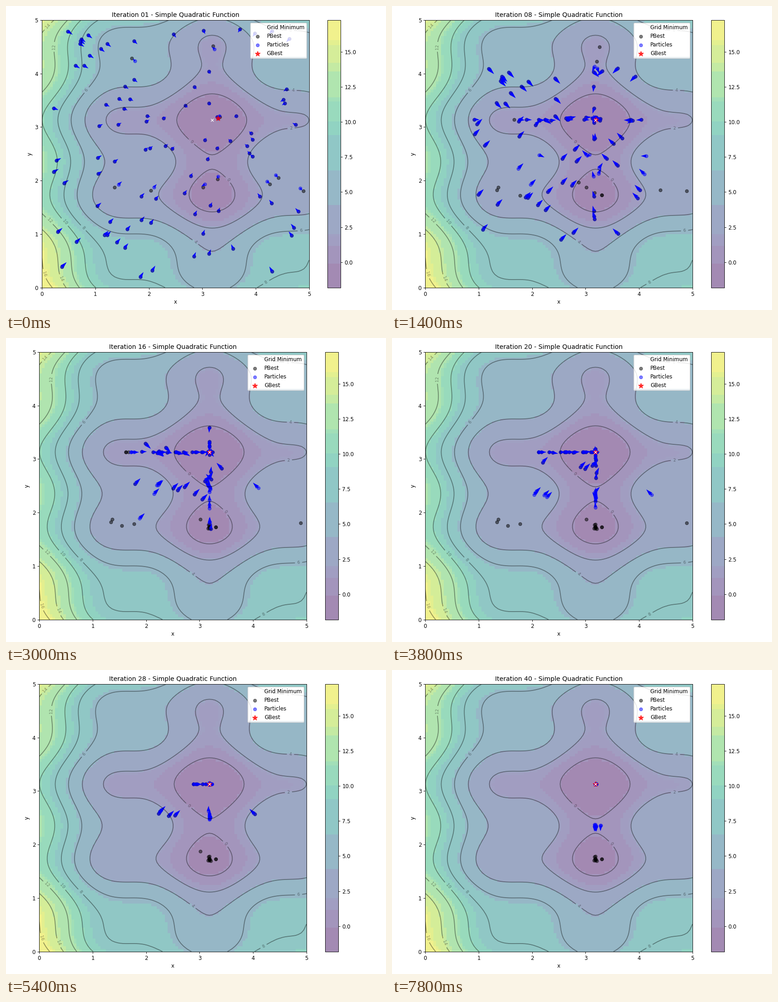
A matplotlib script for the animation above (8000 ms loop, 837x669 px).

```python
import numpy as np
import matplotlib.pyplot as plt
from matplotlib.animation import FuncAnimation
from matplotlib.colors import ListedColormap
from matplotlib.patches import Rectangle

W, H, DPI = 837, 669, 83.65
STEPS, INTERVAL = 40, 200
N = 100
INERTIA, C1, C2, V_MAX = 0.3, 1.0, 1.0, 0.1
SIDE = 588.8  # plot area in pixels
LABELS = [(0.106, 4.89), (0.216, 4.50), (0.828, 3.70), (4.70, 3.70),
          (4.66, 2.99), (2.81, 2.74), (3.49, 2.02), (2.88, 0.86),
          (4.85, 1.07), (4.19, 0.11), (0.15, 1.26), (0.44, 1.235),
          (0.785, 1.125), (0.055, 0.26), (0.37, 0.165), (4.65, 4.82)]


def f(x, y):
    return (x - 3.14)**2 + (y - 2.72)**2 + np.sin(3 * x + 1.41) + np.sin(4 * y - 1.73)


def swarm():
    """Positions, velocities, personal bests and global best for every step."""
    rng = np.random.RandomState(100)
    pos = rng.rand(2, N) * 5
    vel = rng.randn(2, N) * 0.1
    best, best_val = pos.copy(), f(*pos)
    lead = best[:, best_val.argmin()]
    states = []
    for step in range(STEPS + 1):
        r1, r2 = rng.rand(2)
        vel = INERTIA * vel + C1 * r1 * (best - pos) + C2 * r2 * (lead[:, None] - pos)
        vel = np.clip(vel, -V_MAX, V_MAX)
        pos = pos + vel
        val = f(*pos)
        best = np.where(val <= best_val, pos, best)
        best_val = np.minimum(val, best_val)
        lead = best[:, best_val.argmin()]
        if step:  # the first move is a warm-up
            states.append((pos, vel, best, lead))
    return states


def banded_map(z):
    """Pale viridis, merged into flat bands of similar colour."""
    rgb = (plt.get_cmap("viridis")(np.arange(256))[:, :3] + 1) * 127.5
    level = np.clip((z - z.min()) / np.ptp(z) * 256, 0, 255).astype(int)
    weight = np.bincount(level.ravel(), minlength=256) + 2
    cells = np.floor(rgb / [32, 16, 32])
    out = rgb.copy()
    for cell in np.unique(cells, axis=0):
        same = (cells == cell).all(axis=1)
        out[same] = np.average(rgb[same], axis=0, weights=weight[same])
    return ListedColormap(out / 255)


def place(axes, left, width):
    axes.set_position([left / W, 49.3 / H, width / W, SIDE / H])


def arrange(settled):
    place(ax, 73.2 if settled else 79, SIDE)
    place(bar.ax, 702.7 if settled else 707.6, SIDE / 20)


states = swarm()
grid_x, grid_y = np.meshgrid(np.linspace(0, 5, 100), np.linspace(0, 5, 100))
z = f(grid_x, grid_y)
low = z.argmin()

fig, ax = plt.subplots(figsize=((W + 0.01) / DPI, (H + 0.01) / DPI), dpi=DPI)
image = ax.imshow(z, extent=[0, 5, 0, 5], origin="lower", cmap=banded_map(z))
bar = fig.colorbar(image, ax=ax)
arrange(settled=True)
ax.plot(grid_x.flat[low], grid_y.flat[low], "x", ms=5, color="white", label="Grid Minimum")
lines = ax.contour(grid_x, grid_y, z, 10, colors="black", alpha=0.4)
ax.clabel(lines, inline=True, fontsize=8, fmt="%.0f", manual=LABELS)

pos, vel, best, lead = states[0]
best_dots = ax.scatter(*best, color="black", alpha=0.5, label="PBest")
dots = ax.scatter(*pos, color="blue", alpha=0.5, label="Particles")
arrows = ax.quiver(*pos, *vel, color="blue", width=0.005, angles="xy",
                   scale_units="xy", scale=1)
star = ax.scatter(*lead, marker="*", s=100, color="red", alpha=0.8, label="GBest")
ax.set(xlim=(0, 5), ylim=(0, 5), xlabel="x", ylabel="y")
ax.legend(loc="upper right")
# white backing keeps the legend bright
ax.add_patch(Rectangle((0.782, 0.863), 0.207, 0.127, transform=ax.transAxes,
                       color="white", lw=0, zorder=0.5))


def draw(k):
    pos, vel, best, lead = states[k]
    arrange(settled=k > 0)  # the layout settles after the first step
    ax.set_title(f"Iteration {k + 1:02d} - Simple Quadratic Function")
    best_dots.set_offsets(best.T)
    dots.set_offsets(pos.T)
    arrows.set_offsets(pos.T)
    arrows.set_UVC(*vel)
    star.set_offsets([lead])
    return ()


anim = FuncAnimation(fig, draw, frames=STEPS, init_func=lambda: draw(0),
                     interval=INTERVAL, repeat=True, repeat_delay=0)
plt.show()
```
